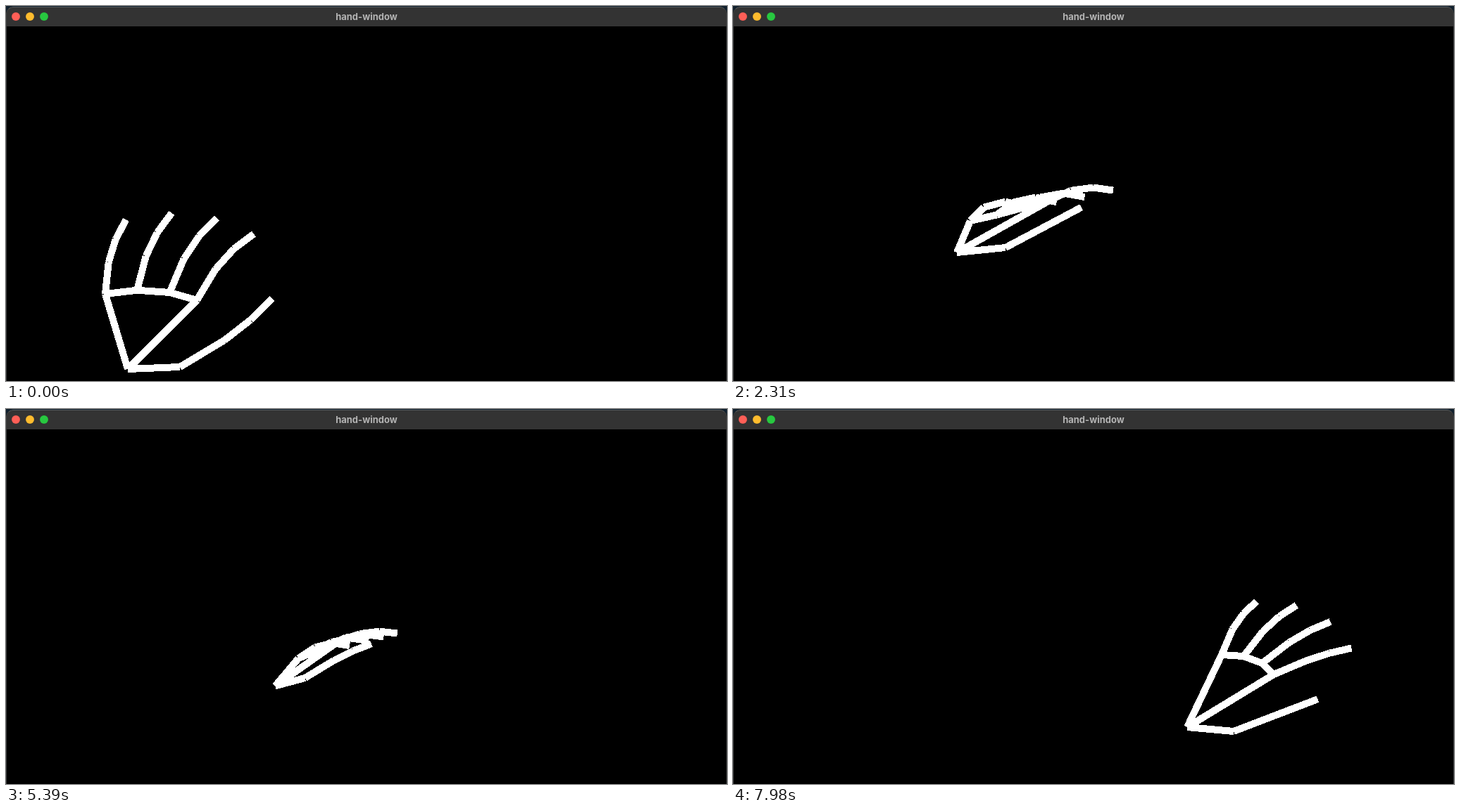
An HTML page that plays this animation: 1024x534 px, repeating every 8 s.

```html
<!DOCTYPE html>
<html lang="en">
<head>
<meta charset="utf-8">
<title>hand-window</title>
<style>
  html, body { margin: 0; width: 100%; height: 100%; overflow: hidden; background: #10202e; }
  .window {
    position: absolute; left: 0; top: 1px; width: 1024px; height: 533px;
    overflow: hidden; background: #000; border-radius: 10px 10px 0 0;
  }
  .window::after {
    content: ""; position: absolute; inset: 0 0 -2px; border: 1px solid #3a3c3d;
    border-top-color: #555b5e; border-radius: 10px 10px 0 0;
  }
  .bar {
    position: absolute; left: 0; top: 0; width: 100%; height: 28px;
    background: #333; color: #b4b4b4; text-align: center;
    font: 700 13px/28px Inter, "Open Sans", sans-serif;
  }
  .bar i {
    position: absolute; top: 8px; width: 12px; height: 12px; border-radius: 50%;
    box-shadow: inset 0 0 0 .5px rgba(0, 0, 0, .12);
  }
  svg { position: absolute; left: 0; top: -1px; }
  path { fill: none; stroke: #fff; stroke-width: 10; shape-rendering: crispEdges; }
</style>
</head>
<body>
<div class="window">
  <svg width="1024" height="534"><path id="bones"/></svg>
  <div class="bar">
    <i style="left:8px;background:#ff5f57"></i>
    <i style="left:28px;background:#febc2e"></i>
    <i style="left:48px;background:#28c840"></i>
    hand-window
  </div>
</div>
<script>
const LOOP = 8000, STEP = 70;
const bones = document.getElementById('bones');

const lerp = (a, b, k) => a + (b - a) * k;
const mix = (a, b, k) => a.map((v, i) => lerp(v, b[i], k));

// Four joints from a base: every bone turns by `curl` degrees against the one before.
function finger([x, y, length, angle, curl], first) {
  const rest = 1 - first;
  const joints = [x, y];
  [first, rest * 0.52, rest * 0.48].forEach((share, i) => {
    const a = (angle + curl * i) * Math.PI / 180;
    x += length * share * Math.cos(a);
    y += length * share * Math.sin(a);
    joints.push(x, y);
  });
  return joints;
}

// Fingers are [x, y, length, angle, curl]; the two between index and pinky
// are blended from them and sit on an arched row of knuckles.
function hand(wrist, thumb, index, pinky, { first, arch = 0.08, mid = 0.33 }) {
  const between = k => {
    const [x, y, length, angle, curl] = mix(index, pinky, k);
    return [x + arch * (x - wrist[0]), y + arch * (y - wrist[1]), length * 1.05, angle, curl];
  };
  const fingers = [index, between(mid), between(mid + 0.33), pinky];
  const joints = [finger(thumb, 0.45), ...fingers.map(f => finger(f, first))].flat();
  return { wrist, joints: joints.map((v, i) => v - wrist[i % 2]) };
}

const reach = hand([173, 517], [247, 514, 164, -31, -7],
  [271, 419, 126, -59, 11], [141, 410, 111, -84, 11], { first: 0.41 });
const spread = hand([247, 394], [330, 374, 170, -33, -4],
  [359, 261, 144, -45, 2], [219, 271, 116, -118, 7], { first: 0.45, arch: 0.11, mid: 0.36 });
const flat = hand([318, 351], [387, 344, 122, -28, 0],
  [455, 274, 88, -24, 16], [337, 306, 88, -45, 30], { first: 0.31, arch: -0.04 });
const turned = hand([355, 355], [362, 319, 171, -40, 15],
  [398, 260, 164, -16, 10], [461, 289, 134, -21, 9], { first: 0.48 });
const back = hand([435, 400], [371, 376, 98, -113, 4],
  [407, 293, 64, -91, -6], [517, 318, 57, -66, -17], { first: 0.58, arch: 0.11, mid: 0.41 });
const curled = hand([395, 389], [450, 381, 121, -35, -8],
  [471, 300, 70, -61, 54], [381, 294, 82, -73, 76], { first: 0.48, arch: 0.05 });
const lean = hand([645, 453], [711, 459, 128, -21, 0],
  [768, 378, 117, -23, 5], [694, 350, 92, -67, 12], { first: 0.43 });
const opening = { joints: mix(reach.joints, spread.joints, 0.8) };

const key = (time, { wrist, joints }, at = wrist, sx = 1, sy = 1) => ({
  time, wrist: at, joints: joints.map((v, i) => v * (i % 2 ? sy : sx))
});
const keys = [
  key(0, reach),
  key(840, opening, [234, 446], 1.13, 1.2),
  key(1400, spread),
  key(1680, spread, [284, 352], 0.95, 0.73),
  key(2310, flat),
  key(3220, turned),
  key(3990, back, [432, 404], 1.06, 1.23),
  key(4340, back),
  key(5040, turned, [388, 393], 0.72, 0.72),
  key(5530, flat, [380, 395], 0.83, 0.8),
  key(5880, curled, [388, 394], 1, 0.8),
  key(6300, curled),
  key(6720, reach, [391, 395], 0.82, 0.94),
  key(7560, reach, [556, 427], 0.82, 0.94),
  key(7980, lean)
];

// Every bone is its own subpath, so the joints keep their notches.
const chain = points => points.slice(1).map((p, i) => `M${points[i]}L${p}`).join('');

function draw(t) {
  const n = Math.max(1, keys.findIndex(k => k.time >= t));
  const a = keys[n - 1], b = keys[n];
  const k = (t - a.time) / (b.time - a.time);
  const wrist = mix(a.wrist, b.wrist, k);
  const joints = mix(a.joints, b.joints, k);
  const at = i => [wrist[0] + joints[2 * i], wrist[1] + joints[2 * i + 1]];
  const fingers = [0, 4, 8, 12, 16].map(i => [at(i), at(i + 1), at(i + 2), at(i + 3)]);
  const [thumb, ...others] = fingers;
  const palm = [wrist, ...others.map(f => f[0]), wrist];
  bones.setAttribute('d', [[wrist, ...thumb], ...others, palm].map(chain).join(''));
}

function frame() {
  const t = performance.now() % LOOP;
  draw(Math.floor(t / STEP) * STEP);
  requestAnimationFrame(frame);
}
frame();
</script>
</body>
</html>
```
